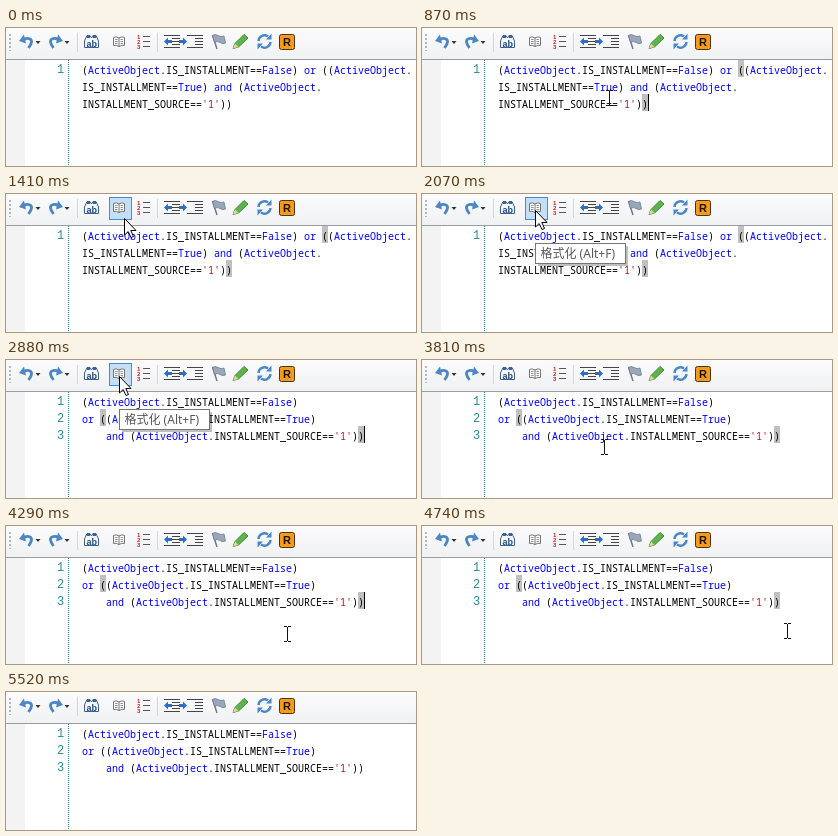
Write an HTML page that moves like this. It is 410 by 138 pixels and loops after 5640 ms.

```html
<!DOCTYPE html>
<html lang="zh">
<head>
<meta charset="utf-8">
<style>
  html, body { margin: 0; width: 100%; height: 100%; overflow: hidden; background: #fff; }
  svg { display: block; width: 410px; height: 138px; }
  .code text { font: 10px "Noto Sans Mono", "DejaVu Sans Mono", monospace; white-space: pre; fill: #000; }
  .code .num { font: 12px "Liberation Mono", monospace; fill: #2b8a8f; }
  .code .word { fill: #0000ff; }
  .code .str { fill: #a31515; }
  #tip text { font: 12px "Noto Sans", "Noto Sans CJK SC", "Noto Sans CJK", sans-serif; fill: #575757; }
  .crisp { shape-rendering: crispEdges; }
  .bold { font-family: "Liberation Sans", sans-serif; font-weight: 700; }
</style>
</head>
<body>
<svg viewBox="0 0 410 138">
  <defs>
    <linearGradient id="bar" x2="0" y2="1">
      <stop stop-color="#fbfbfc"/><stop offset="1" stop-color="#f0f1f3"/>
    </linearGradient>
    <g id="turn">
      <path d="M18 11.500C22 9 26 11 25.500 14C25.300 16 24 18 22.500 20" fill="none" stroke="#4c86c6" stroke-width="2.800"/>
      <path d="M13 13L18 6.500L20 15.500Z" fill="#4c86c6"/>
    </g>
    <path id="drop" d="M-2.500 0H2.500L0 3Z" fill="#333"/>
    <g id="lines" class="crisp">
      <path d="M-8 -6.500H8M0 -3.500H8M0 -.5H8M0 2.500H8M-8 5.500H8" stroke="#444"/>
    </g>
    <path id="shift" d="M-8 -.5L-4 -4.500V-2H0V1H-4V3.500Z" fill="#2a6fc4"/>
  </defs>

  <rect width="410" height="138" fill="#fff"/>
  <rect width="410" height="31" fill="url(#bar)"/>
  <rect y="32" width="19" height="106" fill="#f3f3f3"/>
  <path class="crisp" d="M0 31.500H410" stroke="#9a9da3"/>
  <path class="crisp" d="M62.500 32V138" stroke="#2b8a8f" stroke-dasharray="1 1"/>
  <path class="crisp" d="M71.500 5V24M151.500 5V24" stroke="#d3d5d9"/>
  <path class="crisp" d="M4 6V23" stroke="#b4b8be" stroke-width="2" stroke-dasharray="2 2"/>

  <rect id="button" class="crisp" x="103.500" y="3.500" width="22" height="22" stroke="#3c8fd8"/>

  <use href="#turn"/>
  <use href="#drop" x="32" y="13"/>
  <use href="#turn" transform="translate(70 0) scale(-1 1)"/>
  <use href="#drop" x="61" y="13"/>

  <g id="find">
    <path d="M78.500 19.500V13L81 7.500H84L85.500 10L87 7.500H90L92.500 13V19.500Z" fill="#f4f8fd" stroke="#3c618f"/>
    <path d="M81 9H84M87 9H90" stroke="#3c618f" stroke-width="2"/>
    <text class="bold" x="80.500" y="18.500" font-size="9" fill="#244d83">ab</text>
  </g>
  <g id="book" fill="#fff" stroke="#666" stroke-width=".9">
    <path d="M113 10Q110 8 107.500 9.500V17.500Q110 16.500 113 18.500Q116 16.500 118.500 17.500V9.500Q116 8 113 10V18.500"/>
    <path d="M109 11.500H111.500M109 13.500H111.500M109 15.500H111.500M114.500 11.500H117M114.500 13.500H117M114.500 15.500H117" stroke-width=".7"/>
  </g>
  <g id="list">
    <path class="crisp" d="M137 8.500H144M137 13.500H144M137 18.500H144" stroke="#555"/>
    <g class="bold" font-size="6" fill="#c22">
      <text x="131" y="10.500">1</text><text x="131" y="15.500">2</text><text x="131" y="20.500">3</text>
    </g>
  </g>
  <g transform="translate(166 14)"><use href="#lines"/><use href="#shift"/></g>
  <g transform="translate(189 14)"><use href="#lines"/><use href="#shift" transform="translate(-8 0) scale(-1 1)" x="8"/></g>
  <g id="flag">
    <path d="M206.500 7L211 21" stroke="#6d7785" stroke-width="1.500"/>
    <path d="M206.500 7.500Q209 5.500 212 7.500T218 8L219.500 15Q217 16.500 214 14.500T208.500 14.500Z" fill="#9aa7ba" stroke="#6f7c90" stroke-width=".8"/>
  </g>
  <g id="pen">
    <path d="M227 20.500L229 15.500L238 6.500L242 10L232.500 19Z" fill="#5cb548" stroke="#3d8a34"/>
    <path d="M227 20.500L229 15.500L232.500 19Z" fill="#e8cf9c"/>
  </g>
  <g id="refresh" fill="none" stroke="#4a87c8" stroke-width="2.400">
    <path d="M252.500 13A6 6 0 0 1 262 8.500M264.500 14A6 6 0 0 1 255 18.500"/>
    <path d="M260 11.500H265.500V5.500ZM257 15.500H251.500V21.500Z" fill="#4a87c8" stroke="none"/>
  </g>
  <rect x="273.500" y="6.500" width="15" height="15" rx="2" fill="#f59a1b" stroke="#4a3213"/>
  <text class="bold" x="277" y="18" font-size="11" fill="#1d1408">R</text>

  <g id="marks" class="crisp" fill="#c0c0c0">
    <rect width="6" height="17"/><rect width="6" height="17"/>
  </g>
  <g id="before" class="code"></g>
  <g id="after" class="code"></g>
  <rect id="caret" class="crisp" width="1" height="17"/>

  <g id="tip">
    <rect class="crisp" x="116" y="52" width="90" height="20" fill="#000" opacity=".25"/>
    <rect class="crisp" x="113.500" y="49.500" width="90" height="20" fill="#fff" stroke="#767676"/>
    <text x="118.500" y="64">格式化 (Alt+F)</text>
  </g>
  <path id="arrow" d="M.5 .5V17L4.200 13.500L7 19.500L9.500 18.500L6.800 12.500H12Z" fill="#fff" stroke="#000"/>
  <path id="beam" class="crisp" d="M-3 -7.500H0M1 -7.500H4M-3 7.500H0M1 7.500H4M.5 -7V7" stroke="#111"/>
</svg>
<script>
const LOOP = 5640, STEP = 30;
const LEFT = 76, TOP = 32, CHAR = 6, LINE = 17;
const FORMAT_AT = 2880;
const $ = id => document.getElementById(id);
const show = (id, on) => { $(id).style.display = on ? '' : 'none'; };

const colour = s => s
  .replace(/\b(ActiveObject|True|False|or|and)\b/g, '<tspan class="word">$1</tspan>')
  .replace(/'\d'/g, '<tspan class="str">$&</tspan>');

function fill(id, lines, numbers) {
  const baseline = i => TOP + 14 + i * LINE;
  $(id).innerHTML =
    lines.map((s, i) => `<text x="${LEFT}" y="${baseline(i)}">${colour(s)}</text>`).join('') +
    Array.from({ length: numbers }, (_, i) =>
      `<text class="num" x="51" y="${baseline(i) - 1}">${i + 1}</text>`).join('');
}

fill('before', [
  '(ActiveObject.IS_INSTALLMENT==False) or ((ActiveObject.',
  'IS_INSTALLMENT==True) and (ActiveObject.',
  "INSTALLMENT_SOURCE=='1'))"
], 1);
fill('after', [
  '(ActiveObject.IS_INSTALLMENT==False)',
  'or ((ActiveObject.IS_INSTALLMENT==True)',
  "    and (ActiveObject.INSTALLMENT_SOURCE=='1'))"
], 3);

// time, x, y of the pointer's hot spot
const pointer = [
  [150, 394, 88], [330, 304, 95], [480, 270, 97], [720, 270, 97],
  [870, 187, 70], [1050, 152, 49], [1260, 130, 34], [1410, 118, 24],
  [1590, 114, 18], [1800, 113, 16], [3390, 113, 16], [3480, 115, 25],
  [3570, 121, 40], [3750, 165, 78], [3960, 224, 109], [4110, 252, 110],
  [4290, 281, 108], [4530, 314, 108], [4950, 416, 102]
];
const blinks = [540, 1050, 1560, 2070, 2640, 3420, 3930, 4440, 4950, 5460];

function pointerAt(t) {
  const i = pointer.findIndex(p => p[0] > t);
  if (i < 1) return null;
  const [a, b] = [pointer[i - 1], pointer[i]];
  const k = (t - a[0]) / (b[0] - a[0]);
  return [1, 2].map(n => Math.round(a[n] + (b[n] - a[n]) * k));
}

const ramp = (t, from, to) => Math.min(1, Math.max(0, (t - from) / (to - from)));

function place(el, line, col) {
  el.setAttribute('x', LEFT + col * CHAR);
  el.setAttribute('y', TOP + line * LINE);
}

function draw(t) {
  const formatted = t >= FORMAT_AT;
  show('before', !formatted);
  show('after', formatted);

  const [open, close] = formatted ? [[1, 3], [2, 46]] : [[0, 40], [2, 24]];
  const [first, last] = $('marks').children;
  place(first, ...open);
  place(last, ...close);
  place($('caret'), close[0], close[1] + 1);
  show('marks', t >= 540 && t < 5520);
  show('caret', blinks.filter(b => b <= t).length % 2 === 1);

  const pos = pointerAt(t);
  const inBar = pos && pos[1] < 31;
  show('arrow', inBar);
  show('beam', pos && !inBar);
  if (pos) $(inBar ? 'arrow' : 'beam').setAttribute('transform', `translate(${pos})`);

  const hover = pos && pos[0] < 126 && pos[1] < 26;
  const pressed = t >= 2730 && t < FORMAT_AT;
  show('button', hover);
  $('button').setAttribute('fill', pressed ? '#80bceb' : '#c4def4');

  $('tip').style.opacity = ramp(t, 1830, 2010) * (1 - ramp(t, 3510, 3720));
}

const start = performance.now();
function frame() {
  const t = (performance.now() - start) % LOOP;
  draw(Math.floor(t / STEP) * STEP);
  requestAnimationFrame(frame);
}
frame();
</script>
</body>
</html>
```
